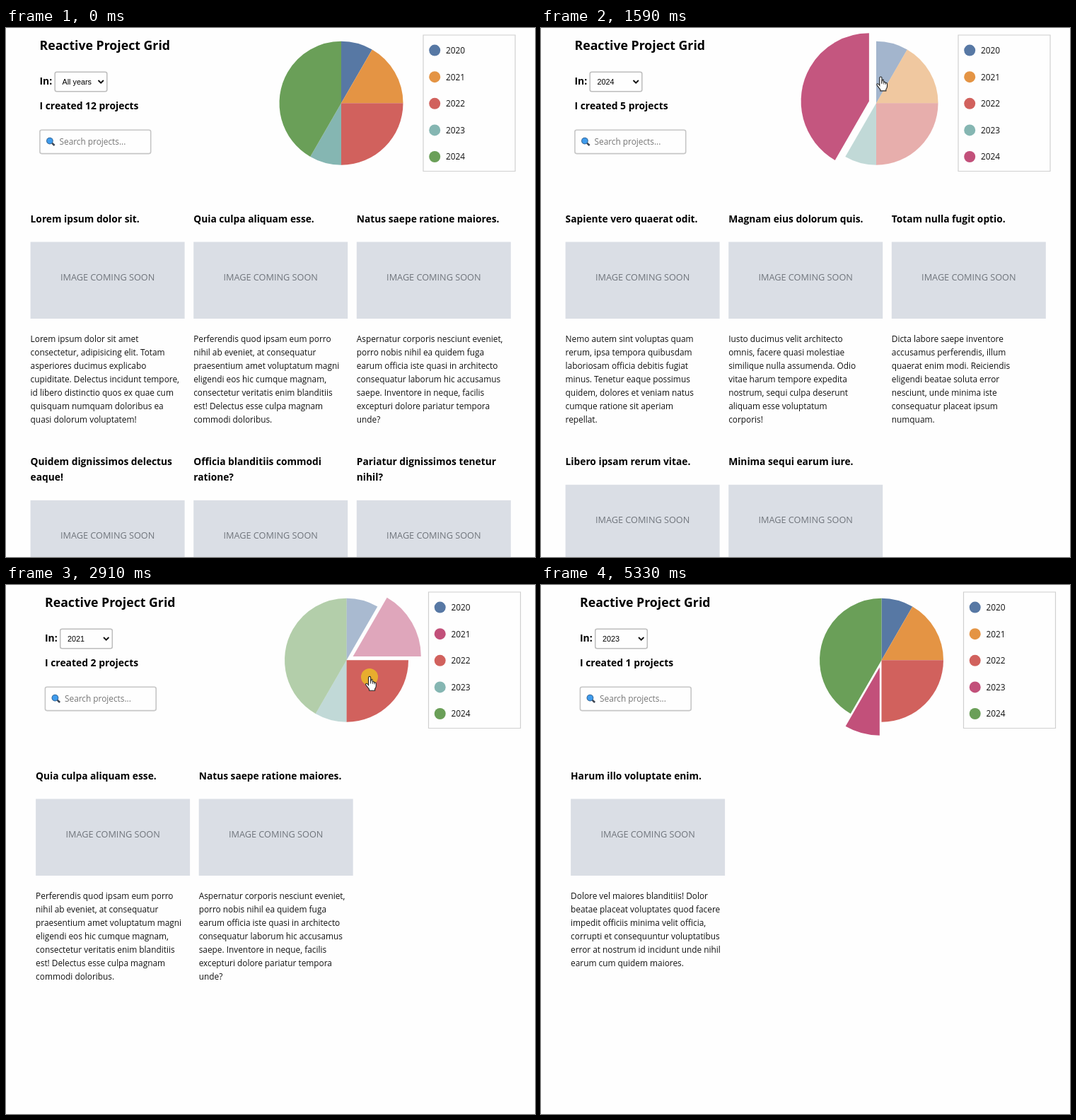
An HTML page with a canvas for the animation above (5.93 s loop, 748 by 748 pixels).

```html
<!DOCTYPE html>
<html lang="en">
<head>
<meta charset="utf-8">
<title>Reactive Project Grid</title>
<style>
  html, body { margin: 0; width: 100%; height: 100%; overflow: hidden; background: #fefefe; }
  canvas { display: block; width: 748px; height: 748px; }
</style>
</head>
<body>
<canvas id="stage" width="748" height="748"></canvas>
<script>
const ctx = document.getElementById('stage').getContext('2d');
const LOOP = 5930;
const FADE = 300;

const SANS = '"Open Sans", "Noto Sans", sans-serif';
const FONT = {
  title: `bold 17.7px ${SANS}`,
  heading: `bold 13.9px ${SANS}`,
  card: `bold 13.75px ${SANS}`,
  body: `11.85px ${SANS}`,
  image: `12.7px ${SANS}`,
  select: '10.8px "Liberation Sans", Arial, sans-serif',
};

const PICKED = [194, 80, 122];
const years = [
  { label: '2020', count: 1, color: [87, 120, 164] },
  { label: '2021', count: 2, color: [228, 148, 68] },
  { label: '2022', count: 3, color: [209, 97, 93] },
  { label: '2023', count: 1, color: [133, 182, 178] },
  { label: '2024', count: 5, color: [106, 159, 88] },
];

// Each project: year index, title lines, paragraph lines.
const projects = [
  [0, 'Lorem ipsum dolor sit.', 'Lorem ipsum dolor sit amet|consectetur, adipisicing elit. Totam|asperiores ducimus explicabo|cupiditate. Delectus incidunt tempore,|id libero distinctio quos ex quae cum|quisquam numquam doloribus ea|quasi dolorum voluptatem!'],
  [1, 'Quia culpa aliquam esse.', 'Perferendis quod ipsam eum porro|nihil ab eveniet, at consequatur|praesentium amet voluptatum magni|eligendi eos hic cumque magnam,|consectetur veritatis enim blanditiis|est! Delectus esse culpa magnam|commodi doloribus.'],
  [1, 'Natus saepe ratione maiores.', 'Aspernatur corporis nesciunt eveniet,|porro nobis nihil ea quidem fuga|earum officia iste quasi in architecto|consequatur laborum hic accusamus|saepe. Inventore in neque, facilis|excepturi dolore pariatur tempora|unde?'],
  [2, 'Quidem dignissimos delectus|eaque!', 'Incidunt aspernatur porro rerum,|aperiam sed sequi perspiciatis,|dolorem mollitia, officia labore esse|cum repellendus. Facilis et inventore|illo, eaque recusandae corrupti, modi|expedita quos eligendi dignissimos|optio nihil incidunt!'],
  [2, 'Officia blanditiis commodi|ratione?', 'Et ut obcaecati ex distinctio tempore|sequi cum, similique molestias|necessitatibus aliquam, praesentium|exercitationem neque dolorem nihil|libero, beatae illum magni optio esse|dicta. Ea optio asperiores deleniti fugit|omnis!'],
  [2, 'Pariatur dignissimos tenetur|nihil?', 'Maxime, aperiam facilis ullam at qui|rem cum voluptas consequatur sequi|molestiae repellat similique architecto|soluta delectus, fuga aut minus|eligendi molestias nostrum distinctio|incidunt temporibus optio quaerat hic.|Omnis.'],
  [3, 'Harum illo voluptate enim.', 'Dolore vel maiores blanditiis! Dolor|beatae placeat voluptates quod facere|impedit officiis minima velit officia,|corrupti et consequuntur voluptatibus|error at nostrum id incidunt unde nihil|earum cum quidem maiores.'],
  [4, 'Sapiente vero quaerat odit.', 'Nemo autem sint voluptas quam|rerum, ipsa tempora quibusdam|laboriosam officia debitis fugiat|minus. Tenetur eaque possimus|quidem, dolores et veniam natus|cumque ratione sit aperiam|repellat.'],
  [4, 'Magnam eius dolorum quis.', 'Iusto ducimus velit architecto|omnis, facere quasi molestiae|similique nulla assumenda. Odio|vitae harum tempore expedita|nostrum, sequi culpa deserunt|aliquam esse voluptatum|corporis!'],
  [4, 'Totam nulla fugit optio.', 'Dicta labore saepe inventore|accusamus perferendis, illum|quaerat enim modi. Reiciendis|eligendi beatae soluta error|nesciunt, unde minima iste|consequatur placeat ipsum|numquam.'],
  [4, 'Libero ipsam rerum vitae.', ''],
  [4, 'Minima sequi earum iure.', ''],
].map(([year, title, text]) => ({ year, title: title.split('|'), text: text.split('|') }));

// Timed states: [ms, year index], -1 for none.
const hovers = [[0, -1], [670, 2], [770, 4], [1580, 0], [2090, 1], [2580, 2], [3300, 3], [4920, -1]];
const picks = [[0, -1], [1180, 4], [1780, 0], [2380, 1], [2990, 2], [3700, 3]];
const clicks = [1080, 1680, 2280, 2890, 3600];
const pointerPath = [
  [380, 688, 700], [480, 660, 620], [580, 600, 440], [680, 505, 165], [780, 452, 122],
  [880, 438, 105], [1090, 437.5, 104.5], [1390, 438, 104], [1590, 480, 70], [1690, 492, 50],
  [1890, 493, 50], [2090, 512.5, 73], [2200, 528, 80], [2400, 528, 82], [2600, 515, 125],
  [2905, 514, 130], [3100, 513, 131], [3310, 473, 150], [3612, 470.5, 157], [4215, 470.5, 157.5],
  [4319, 462.5, 158.5], [4420, 460.5, 158.5], [4521, 460.5, 158.5], [4622, 469, 187],
  [4824, 469, 187], [4925, 500, 270], [5026, 570, 460], [5127, 640, 684], [5228, 668, 728],
];

const lerp = (a, b, p) => a + (b - a) * p;
const stateAt = (events, t) => events.filter(e => e[0] <= t).pop()[1];
const rgb = c => `rgb(${c.map(Math.round)})`;

// Value of a property that eases toward goal(state) after every state change.
function transition(events, goal, t) {
  let from = goal(events[0][1]), to = from, start = 0;
  const value = now => lerp(from, to, 1 - (1 - Math.min(1, (now - start) / FADE)) ** 2);
  for (const [at, state] of events) {
    if (at > t) break;
    if (goal(state) === to) continue;
    from = value(at);
    to = goal(state);
    start = at;
  }
  return value(t);
}

function text(str, x, y, font, color = '#000', align = 'left') {
  ctx.font = font;
  ctx.fillStyle = color;
  ctx.textAlign = align;
  ctx.fillText(str, x, y);
}

function box(x, y, w, h, radius, color, line) {
  ctx.beginPath();
  ctx.roundRect(x, y, w, h, radius);
  ctx.strokeStyle = color;
  ctx.lineWidth = line;
  ctx.stroke();
}

function disc(x, y, r, color) {
  ctx.beginPath();
  ctx.arc(x, y, r, 0, 2 * Math.PI);
  ctx.fillStyle = color;
  ctx.fill();
}

function polyline(points, color, width) {
  ctx.beginPath();
  points.forEach(p => ctx.lineTo(...p));
  ctx.strokeStyle = color;
  ctx.lineWidth = width;
  ctx.stroke();
}

function drawHeader(pick, count) {
  text('Reactive Project Grid', 47.5, 31, FONT.title);
  text('In:', 47.5, 80, FONT.heading);
  box(69.2, 62.2, 73.6, 27.6, 2.5, '#bdbdbd', 1.5);
  text(pick < 0 ? 'All years' : years[pick].label, 79.5, 79.7, FONT.select);
  polyline([[130.5, 74], [134.2, 77.6], [137.9, 74]], '#111', 1.9);
  text(`I created ${count} projects`, 47.5, 115, FONT.heading);

  box(47.9, 144.2, 156.8, 33.4, 2.5, '#c6c6c6', 1.6);
  polyline([[65, 162.6], [68.6, 166]], '#3d4653', 2.6);
  disc(61.9, 159.6, 4.9, '#36699b');
  disc(61.9, 159.6, 3.8, '#3f9ced');
  text('Search projects...', 75.5, 165, FONT.body, '#757575');
}

function drawPie(t) {
  const total = projects.length;
  let angle = -Math.PI / 2;
  years.forEach(({ count, color }, i) => {
    const end = angle + count / total * 2 * Math.PI;
    const mid = (angle + end) / 2;
    const pop = transition(picks, s => +(s === i), t);
    const x = 474 + 10.5 * pop * Math.cos(mid);
    const y = 106.25 + 10.5 * pop * Math.sin(mid);
    ctx.globalAlpha = transition(hovers, s => (s < 0 || s === i ? 1 : 0.5), t);
    ctx.fillStyle = rgb(color.map((c, k) => lerp(c, PICKED[k], pop)));
    ctx.beginPath();
    ctx.moveTo(x, y);
    ctx.arc(x, y, 87.5 * (1 + 0.1 * pop), angle, end);
    ctx.fill();
    angle = end;
  });
  ctx.globalAlpha = 1;
}

function drawLegend(pick) {
  box(590, 10, 130, 192.5, 0, '#d0d0d0', 1.2);
  years.forEach(({ label, color }, i) => {
    const y = 31.6 + 37.6 * i;
    disc(606.2, y, 8, rgb(i === pick ? PICKED : color));
    text(label, 622, y + 4.4, FONT.body, '#111');
  });
}

function drawCard({ title, text: lines }, x, y, titleLines) {
  title.forEach((line, i) => text(line, x, y + 22 * i, FONT.card));
  const top = y + 27.5 + 22 * (titleLines - 1);
  ctx.fillStyle = '#dadee5';
  ctx.fillRect(x, top, 218, 108.5);
  text('IMAGE COMING SOON', x + 109, top + 54.2, FONT.image, '#70757c', 'center');
  lines.forEach((line, i) => text(line, x, top + 141.7 + 18.95 * i, FONT.body, '#111'));
}

function drawCards(list) {
  for (let row = 0; row * 3 < list.length && row < 2; row++) {
    const cards = list.slice(row * 3, row * 3 + 3);
    const titleLines = Math.max(...cards.map(c => c.title.length));
    cards.forEach((c, i) => drawCard(c, 34.6 + 230.6 * i, 275 + 343.3 * row, titleLines));
  }
}

function pointerAt(t) {
  const next = pointerPath.findIndex(p => p[0] > t);
  if (next < 1) return null;
  const [t0, x0, y0] = pointerPath[next - 1];
  const [t1, x1, y1] = pointerPath[next];
  const p = (t - t0) / (t1 - t0);
  return [lerp(x0, x1, p), lerp(y0, y1, p)];
}

const HAND = new Path2D(`M-1.5 11.5V1Q-1.3-.6 .2-.6Q1.6-.6 1.7 1V6.4Q4-.2 4.4 7
  Q6.6 6.2 6.9 8Q9.2 7.4 9.3 9.6V13Q9 15.5 7.6 17V19.3H-.4V17.5L-5 11.5Q-5.9 9.6-4.6 9.2Q-3 9-1.5 11.5Z`);
const ARROW = new Path2D('M0 0V16L3.7 12.6L6.2 18.2L8.5 17.2L6 11.7H11.3Z');

function drawPointer(t) {
  const at = pointerAt(t);
  if (!at) return;
  const hand = stateAt(hovers, t) >= 0;
  if (clicks.some(c => t >= c && t < c + 200)) disc(...at, 12, 'rgba(255, 250, 0, 0.5)');
  ctx.save();
  ctx.translate(...at);
  const shape = hand ? HAND : ARROW;
  ctx.fillStyle = '#fff';
  ctx.fill(shape);
  ctx.strokeStyle = '#222';
  ctx.lineWidth = 1.1;
  ctx.stroke(shape);
  if (hand) {
    polyline([[1.7, 6.5], [1.7, 9.5]], '#222', 0.8);
    polyline([[4.4, 7], [4.4, 10]], '#222', 0.8);
    polyline([[6.9, 8], [6.9, 10.5]], '#222', 0.8);
  }
  ctx.restore();
}

const stepTime = t => (t < 380 ? 0 : 380 + 101 * Math.floor((t - 370) / 101));

function draw(now) {
  const t = stepTime(now % LOOP);
  const pick = stateAt(picks, t);
  const shown = projects.filter(p => pick < 0 || p.year === pick);

  ctx.fillStyle = '#fefefe';
  ctx.fillRect(0, 0, 748, 748);
  ctx.save();
  // Short pages have no scrollbar, so the layout sits further right.
  if (shown.length <= 3) ctx.translate(7.5, 0);
  drawHeader(pick, shown.length);
  drawPie(t);
  drawLegend(pick);
  drawCards(shown);
  ctx.restore();
  drawPointer(t);
}

const start = performance.now();
function tick() {
  draw(performance.now() - start);
  requestAnimationFrame(tick);
}
tick();
</script>
</body>
</html>
```
